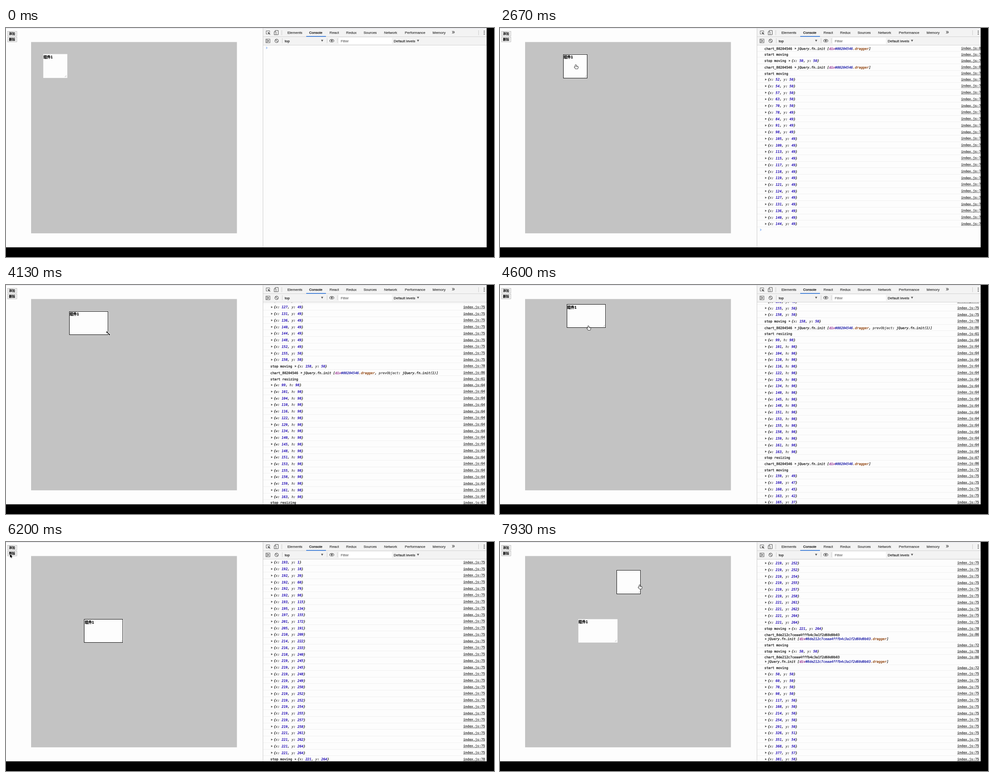
These frames come from a looping animation (1089x514 px, 8 s). An HTML page with a canvas:

```html
<!DOCTYPE html>
<html lang="zh">
<head>
<meta charset="utf-8">
<style>
html, body { margin: 0; width: 100%; height: 100%; overflow: hidden; }
canvas { display: block; }
</style>
</head>
<body>
<canvas id="stage" width="1089" height="514"></canvas>
<script>
const g = document.getElementById('stage').getContext('2d');
const LOOP = 8000, STEP = 1000 / 15;
const SANS = '"Liberation Sans", sans-serif';
const CJK = '"Noto Sans CJK SC", "Noto Sans CJK", sans-serif';
const MONO = '7.35px "DejaVu Sans Mono", monospace';

// "5*3 7" -> [5, 5, 5, 7]
const runs = text => text.split(' ').flatMap(part => {
  const [value, count = 1] = part.split('*').map(Number);
  return Array(count).fill(value);
});

// Drags: samples come every `step` ms; the box runs `lead` samples ahead of the console.
const drags = [
  { box: 0, keys: 'xy', start: 2330, step: 15.5, lead: 4, grab: [28, 24], code: 75,
    a: runs('54 57 63 70 78 84 91 98 105 109 113 115 117 118 119 121 124 127 131 136 140 144 148 152 155 158'),
    b: runs('50*4 49*20 50*2') },
  { box: 0, keys: 'wh', start: 3680, step: 13.5, lead: 1, code: 64,
    a: runs('99 101 104 110 116 122 129 134 140 145 148 151 153 155 158 159 161 163'),
    b: runs('98*18') },
  { box: 0, keys: 'xy', start: 4530, step: 17, lead: 2, grab: [48, 49], code: 75,
    a: runs('159 160*2 163 165 169 173 178 183 186 189 190 191 193 194*7 193 192*5 193 195 197 201 205 210 214 216 218 219*11 221*4'),
    b: runs('49 47 45 42 37 30 21 13 1 0*12 1 18 39 60 79 98 115 134 155 172 191 209 222 233 240 245*2 248 249 250 252*2 254 255 257 258 261 262 264*2') },
  { box: 1, keys: 'xy', start: 7740, step: 14, lead: 1, grab: [51, 33.5], code: 75,
    a: runs('50 60 70 98 117 168 214 254 291 326 351 368 377 381'),
    b: runs('50*9 51 54 56 57 58') }
];

// Console entries; "▸" starts an object preview.
const ROW = 14.73, PLAIN = 12.7, DOUBLE = 23.3;
const logs = [];
const log = (time, text, code) => logs.push({ time, text, code,
  height: text.includes('\n') ? DOUBLE : text.includes('▸') ? ROW : PLAIN });
const pair = (keys, a, b) => `▸{${keys[0]}: ${a}, ${keys[1]}: ${b}}`;
const grabLog = (time, id, action, code, gap = ' ', extra = '') => {
  log(time, `chart_${id}${gap}▸jQuery.fn.init [div#${id}.dragger${extra}]`, 86);
  log(time, 'start ' + action, code);
};
const stopLog = (time, x, y) => log(time, 'stop moving ' + pair('xy', x, y), 78);
const dragLog = d => d.a.forEach((a, i) => log(d.start + i * d.step, pair(d.keys, a, d.b[i]), d.code));
const ID = '80204546', NEW_ID = '8de212c7ceaa4fffb4c3a1f2d60d0b03';

grabLog(1660, ID, 'moving', 72);
stopLog(1860, 50, 50);
grabLog(2060, ID, 'moving', 72);
log(2130, pair('xy', 52, 50), 75);
dragLog(drags[0]);
stopLog(2860, 158, 50);
grabLog(3660, ID, 'resizing', 61, ' ', ', prevObject: jQuery.fn.init(1)');
dragLog(drags[1]);
log(4130, 'stop resizing', 67);
grabLog(4390, ID, 'moving', 72);
dragLog(drags[2]);
stopLog(5460, 221, 264);
grabLog(7260, NEW_ID, 'moving', 72, '\n');
stopLog(7460, 50, 50);
grabLog(7660, NEW_ID, 'moving', 72, '\n');
dragLog(drags[3]);

// Pointer path between drags: time, x, y, shape
const pointer = [
  [600, -8, 60, 'arrow'], [1190, 103.5, 87, 'arrow'], [1440, 103.5, 87, 'arrow'],
  [1530, 111, 82, 'hand'], [2130, 111, 82, 'hand'], [2330, 113, 82, 'hand'],
  [2660, 169, 82, 'hand'], [2860, 169, 82, 'hand'], [3130, 212, 113, 'arrow'],
  [3460, 195, 110, 'resize'], [3670, 195, 110, 'resize'], [3920, 228, 108.5, 'resize'],
  [4130, 228, 108.5, 'resize'], [4380, 189, 107, 'hand'], [5460, 223, 222, 'hand'],
  [5590, 160, 150, 'arrow'], [5800, 42, 60, 'arrow'], [6180, 9, 27, 'arrow'],
  [6340, 9, 27, 'arrow'], [6530, 9, 13, 'arrow'], [6850, 9, 13, 'arrow'],
  [7250, 134, 92, 'hand'], [8000, 134, 92, 'hand']
];
const shapes = {
  arrow: new Path2D('M0 0V8L1.9 6.3L3.2 9.2L4.5 8.6L3.2 5.8H5.6Z'),
  hand: new Path2D('M-1 1Q0 -.6 1 1V3.2Q4.6 3.2 5 4.8V6.6L4 9H-.2L-3 5.6Q-2.8 4 -1 5.4Z'),
  resize: new Path2D('M-4 -4H-.8L-1.9 -2.9L2.9 1.9L4 .8V4H.8L1.9 2.9L-2.9 -1.9L-4 -.8Z')
};

function rect(x, y, w, h, color) {
  g.fillStyle = color;
  g.fillRect(x, y, w, h);
}
// A hairline stroke gives small text its heavier weight.
function text(str, x, y, color, font) {
  g.font = font;
  g.fillStyle = g.strokeStyle = color;
  g.lineWidth = .25;
  g.fillText(str, x, y);
  g.strokeText(str, x, y);
  return x + g.measureText(str).width;
}
function line(color, width, ...points) {
  g.strokeStyle = color;
  g.lineWidth = width;
  g.beginPath();
  for (const [x, y] of points) g.lineTo(x, y);
  g.stroke();
}
function triangle(x, y, down) {
  g.fillStyle = '#555';
  g.beginPath();
  if (down) { g.moveTo(x - 2.5, y - 2); g.lineTo(x + 2.5, y - 2); g.lineTo(x, y + 2.3); }
  else { g.moveTo(x + 1.6, y - 2.3); g.lineTo(x + 1.6, y + 2.3); g.lineTo(x + 5.2, y); }
  g.fill();
}
function ring(x, y, rx, ry = rx) {
  g.beginPath();
  g.ellipse(x, y, rx, ry, 0, 0, 7);
  g.stroke();
}

function boxesAt(t) {
  const boxes = [{ x: 50, y: 50, w: 100, h: 100 }, { x: 50, y: 50, w: 100, h: 100 }];
  for (const d of drags) {
    if (t < d.start) continue;
    const i = Math.min(d.a.length - 1, Math.floor((t - d.start) / d.step) + d.lead);
    boxes[d.box][d.keys[0]] = d.a[i];
    boxes[d.box][d.keys[1]] = d.b[i];
  }
  return boxes.map(b => ({
    x: 56.4 + b.x * .536, y: 31.7 + b.y * .536, w: b.w * .536, h: b.h * .536
  }));
}

function drawBox({ x, y, w, h }, title, selected) {
  rect(x, y, w, h, '#fdfdfd');
  if (selected) {
    g.strokeStyle = '#111';
    g.lineWidth = 1;
    g.strokeRect(Math.floor(x) + .5, Math.round(y) + .5, Math.round(w) - 1, Math.round(h) - 1);
  }
  const inset = selected ? .6 : 0;
  text(title, x + .2 + inset, y + 9 + inset, '#000', `bold 8.1px ${CJK}`);
  const r = x + w - 2, b = y + h - 2;
  line('#aaa', .7, [r - 4, b], [r, b - 4]);
  line('#aaa', .7, [r - 1.8, b], [r, b - 1.8]);
}

function drawButton(label, y, pressed) {
  rect(3, y, 21.5, 11.5, '#aaa');
  rect(3.7, y + .7, 20.1, 10.1, pressed ? '#c8c8c8' : '#f1f1f1');
  text(label, 6.6, y + 8.3, '#000', `7px ${CJK}`);
}

const tokenColor = token =>
  token === 'div' ? '#881280' : token[0] === '#' ? '#1a1aa6' :
  token[0] === '.' ? '#8a3a00' : /\d/.test(token) ? '#1800b0' : '#484848';

function drawEntry(str, y) {
  const [plain, preview] = str.split('▸');
  const x = text(plain, 590, y + 2.7, '#111', MONO);
  if (!preview) return;
  triangle(x, y);
  preview.split(/(div|#\w+|\.dragger|prevObject|[xywh](?=:)|\d+(?=[,}]))/).reduce((pos, part, i) =>
    text(part, pos, y + 2.7, i % 2 ? tokenColor(part) : '#111', 'italic ' + MONO), x + 7.4);
}

function drawConsole(t) {
  const shown = logs.filter(entry => entry.time <= t);
  const bottom = shown.reduce((sum, entry) => sum + entry.height, 38.65);
  const overflow = bottom > 495;
  let top = overflow ? 38.65 + 495 - bottom : 38.65;
  for (const { text: str, code, height } of shown) {
    if (top + height > 36) {
      const parts = str.split('\n');
      const y = parts.length > 1 ? top + 5.8 : top + height / 2;
      parts.forEach((part, i) => drawEntry(part, y + i * 9.8));
      const link = 'index.js:' + code, x = overflow ? 1020.4 : 1028.9;
      const end = text(link, x, y + 2.1, '#333', MONO);
      line('#444', .7, [x, y + 3.5], [end, y + 3.5]);
      rect(574, Math.round(top + height) - 1, 499, 1, '#f0f0f0');
    }
    top += height;
  }
  line('#367cf1', 1, [580.5, top + 4], [583, top + 6], [580.5, top + 8]);
}

function drawToolbar() {
  rect(574, 1, 499, 37.5, '#f3f3f3');
  for (const y of [19, 38]) rect(574, y, 499, 1, '#d4d4d4');
  const tabs = { Elements: 628, Console: 676.5, React: 722, Redux: 759, Sources: 798,
    Network: 843.5, Performance: 890, Memory: 952 };
  for (const [name, x] of Object.entries(tabs))
    text(name, x, 12.9, name === 'Console' ? '#111' : '#444', `8px ${SANS}`);
  text('»', 995, 13.4, '#444', `12px ${SANS}`);
  rect(670, 18, 44, 1.6, '#2b73d9');
  for (const [x, y] of [[615, 5], [1054, 5], [616, 23], [716, 23], [739, 23]]) rect(x, y, 1, 11, '#ccc');
  for (const y of [6, 9.5, 13]) rect(1066.3, y, 1.8, 1.8, '#444');

  // inspect and device icons
  line('#555', .9, [584, 13.5], [580.7, 13.5], [580.7, 6.5], [588.5, 6.5], [588.5, 9]);
  g.fillStyle = '#555';
  g.fill(new Path2D('M584 9L590 11.2L587.7 12.2L590 14.4L589 15.2L586.8 13L585.8 15Z'));
  line('#555', 1, [600.5, 8], [600.5, 5.5], [607.5, 5.5], [607.5, 15], [603, 15]);
  g.strokeRect(598.5, 8.5, 4, 6.5);

  // sidebar, clear and eye icons
  g.strokeRect(580, 25, 9, 8);
  line('#555', .9, [582.4, 25], [582.4, 33]);
  triangle(582.4, 29);
  line('#555', 1.1, [601.2, 26.2], [606.6, 31.6]);
  ring(603.9, 28.9, 3.8);
  ring(727, 28.7, 4.8, 3.1);
  g.fillStyle = '#555';
  g.beginPath();
  g.arc(727, 28.7, 1.9, 0, 7);
  g.fill();

  rect(743, 22, 118, 14, '#fff');
  text('top', 622, 31.8, '#222', `8px ${SANS}`);
  text('Filter', 747, 31.8, '#757575', `8px ${SANS}`);
  text('Default levels', 865.3, 31.8, '#333', `8px ${SANS}`);
  triangle(705.5, 28.5, true);
  triangle(919.5, 28.5, true);
}

function drawPointer(t, boxes) {
  const next = pointer.findIndex(key => key[0] > t);
  if (next < 1) return;
  const [t0, x0, y0, shape] = pointer[next - 1], [t1, x1, y1] = pointer[next];
  const p = (t - t0) / (t1 - t0), e = p * p * (3 - 2 * p);
  let x = x0 + (x1 - x0) * e, y = y0 + (y1 - y0) * e;
  const d = drags.find(d => t >= d.start && t < d.start + d.step * d.a.length + 40);
  if (d) {
    const box = boxes[d.box];
    [x, y] = d.grab ? [box.x + d.grab[0], box.y + d.grab[1]] : [box.x + box.w, box.y + box.h - 2];
  }
  const hand = shape === 'hand';
  g.save();
  g.translate(x, y);
  g.lineJoin = 'round';
  g.lineWidth = hand ? 1.6 : 1.4;
  g.strokeStyle = hand ? '#111' : '#fff';
  g.fillStyle = hand ? '#fff' : '#000';
  g.stroke(shapes[shape]);
  g.fill(shapes[shape]);
  if (hand) {
    line('#222', .6, [1, 3], [1, 5.4]);
    line('#222', .6, [2.9, 3.6], [2.9, 5.4]);
  }
  g.restore();
}

function draw(t) {
  const boxes = boxesAt(t);
  rect(0, 0, 1089, 514, '#fdfdfd');
  rect(56, 31.5, 459.3, 429.3, '#c3c3c3');
  drawButton('添加', 7, t >= 6720 && t < 6860);
  drawButton('删除', 20, false);
  drawBox(boxes[0], '组件1', t >= 1660 && t < 7260);
  if (t >= 6860) drawBox(boxes[1], '', t >= 7260);
  drawConsole(t);
  drawToolbar();
  rect(0, 0, 1073, 1, '#dedee6');
  rect(573, 0, 1, 493, '#ccc');
  drawPointer(t, boxes);
  rect(1072.6, 0, 17, 514, '#000');
  rect(0, 492.3, 1089, 22, '#000');
}

function frame() {
  const t = performance.now() % LOOP;
  draw(Math.floor((t + 4) / STEP) * STEP);
  requestAnimationFrame(frame);
}
frame();
</script>
</body>
</html>
```
